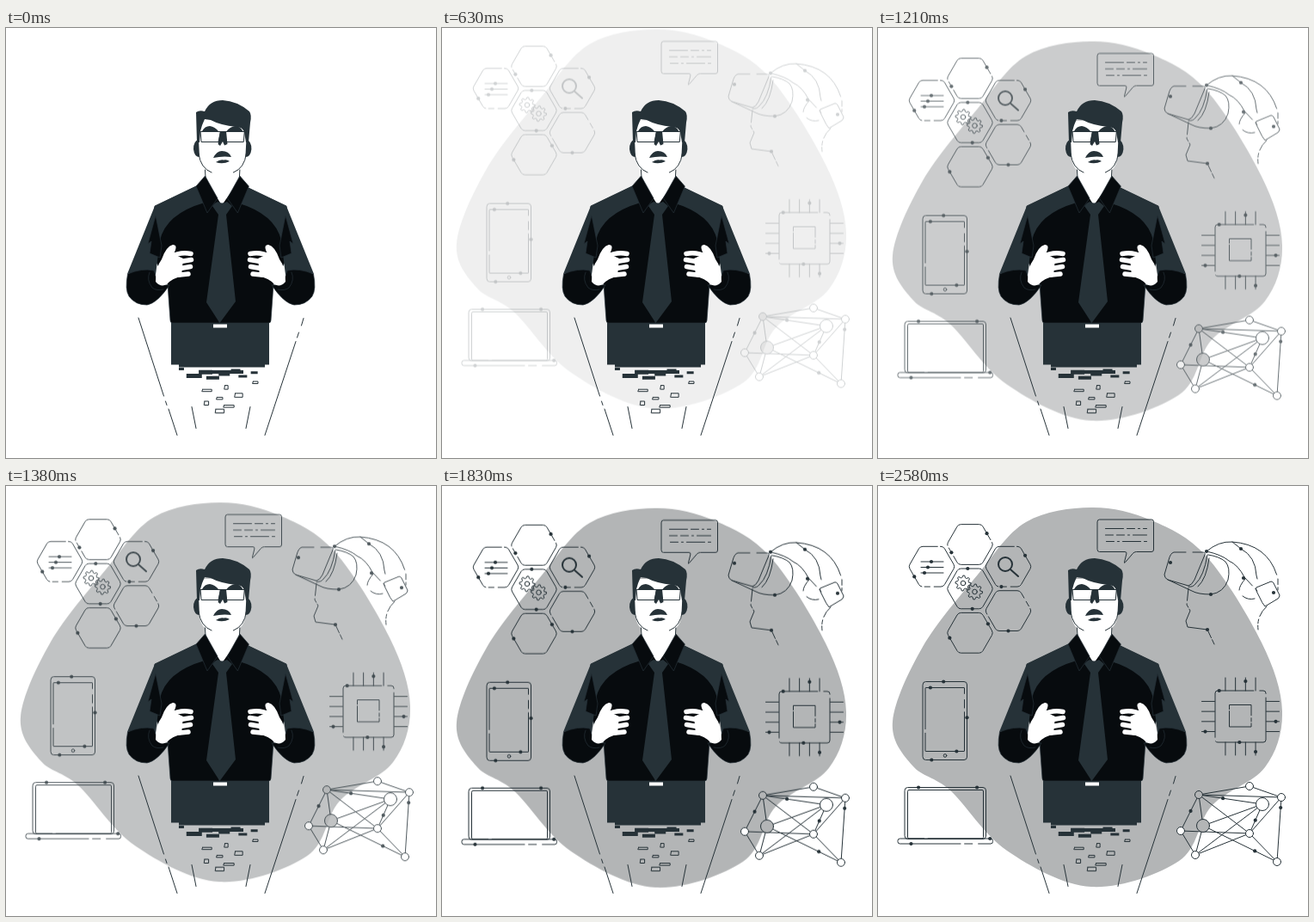
Write an HTML page that moves like this. It is 500 px wide and 500 px high and loops after 2.62 s.

```html
<!DOCTYPE html>
<html lang="en">
<head>
<meta charset="utf-8">
<title>Tech presenter</title>
<style>
html, body { margin: 0; width: 100%; height: 100%; overflow: hidden; background: #fff; }
svg { display: block; width: 100vw; height: 100vh; }
.line { fill: none; stroke: #263238; stroke-linecap: round; stroke-linejoin: round; }
.ink { fill: #263238; }
.black { fill: #070b0e; stroke: #263238; stroke-width: .7; }
.skin { fill: #fff; }
.drop { animation: drop 2620ms infinite; }
.late { animation: late 2620ms infinite step-end; }
@keyframes drop {
  0% { opacity: 0; transform: translateY(-30px); animation-timing-function: cubic-bezier(.36, -.01, .5, 1.38); }
  98.5%, 100% { opacity: 1; transform: none; }
}
@keyframes late {
  0% { opacity: 0; }
  12.59%, 100% { opacity: 1; }
}
</style>
</head>
<body>
<svg viewBox="0 0 500 500">
  <g class="late">
    <path id="blob" class="drop" fill="#b3b5b6"/>
    <g id="icons" class="drop line"></g>
  </g>

  <path class="line" d="M154 337L183.500 428M185.500 434L187 438.500M189 443L199 473.500M346 337.500L343.500 346M340.500 354L338.500 360M337 364.500L301 473.500M216 440.500L221 465.500M284 440.500L279 465.500"/>

  <path class="ink" d="M192 342H306V391.500H192Z"/>
  <g id="side">
    <path class="black" d="M251 190L221 184L173 207L166 255L188 298L191 340Q191 343 194 343H251Z"/>
    <path class="ink" d="M223 183L173 207L141 286Q160 281 174 287L179 247Q186 216 231 203Z"/>
    <path class="black" d="M174 218L165 251L169 248L167 262L179 267L181 253Z"/>
    <path class="black" d="M141.500 286Q138 304 143 312Q150 322 164 322Q176 320 190 299L177 298L172 282Q158 279 141.500 286Z"/>
    <path class="line" stroke-width=".7" d="M167 284Q163 293 170 302Q175 306 183 304"/>
    <path class="skin" d="M174 295Q174 278 181 269Q186 254 194 252Q199 252 197 258L195 263L206 268L204 289Q193 291 187 298Q180 302 174 295Z"/>
    <path fill="none" stroke="#fff" stroke-width="5.5" stroke-linecap="round" d="M191 266Q203 260 215 262.500M194 273L215.500 269.500M194 281L214.500 277.500M192 288L212 286"/>
  </g>
  <use href="#side" transform="matrix(-1 0 0 1 499 0)"/>

  <path class="skin" d="M225 108L224 146Q226 162 231.500 165V176L251 206L272 176V165Q278 161 279 146V108Z"/>
  <g id="half">
    <path class="black" d="M231.500 172L221 184L234 215L246 198Z"/>
    <path class="line" d="M224 146Q226 163 239 168M231.500 165L232 174"/>
    <path class="ink" d="M224 130Q218 131 218 141Q219 150 225 150ZM228 120Q231 114 237 114Q243 115 247 120Z"/>
    <path class="line" style="fill:#fff" d="M226.500 120.500H249.500L247 132.500H227.500Z"/>
  </g>
  <use href="#half" transform="matrix(-1 0 0 1 503.400 0)"/>
  <path class="ink" d="M221 98Q225 95 231 97Q237 84 252 84Q269 85 283 97Q286 101 284 110L282 133L279 133L277 121Q275 115 268 115Q249 113 238 107L231 106Q228 112 226 120L225 133L222 133Z"/>
  <path class="ink" d="M249 120H256L257.500 135L254 136.500L252 132L249 137L246.500 135ZM241 151Q245 143 251 143Q259 143 262 150Q252 148.500 241 151ZM244 156Q249 152.500 253 153.500Q257 152.500 260 155Q252 159 244 156Z"/>
  <path class="ink" d="M240 207Q243 203 246 202Q251 205 257 202L263 207L256 217L267 318L248.500 343L233 319L247 217Z"/>
  <path class="skin" d="M241 344.500H257V348.500H241Z"/>
  <g id="bits"></g>
</svg>
<script>
const $ = id => document.getElementById(id);
const mix = (a, b, t) => [a[0] + (b[0] - a[0]) * t, a[1] + (b[1] - a[1]) * t];
const path = (d, extra = '') => `<path d="${d}" ${extra}/>`;
const ring = ([x, y], r, fill = 'none') => `<circle cx="${x}" cy="${y}" r="${r}" fill="${fill}"/>`;
const dot = p => ring(p, 2.1, '#263238" stroke="none');
const gaps = shift => `pathLength="100" stroke-dasharray="42 3 4 2 47 2" stroke-dashoffset="${shift}"`;
const rect = (x, y, w, h) => [[x, y], [x + w, y], [x + w, y + h], [x, y + h]];
const circle = (n, f) => Array.from({ length: n }, (_, i) => f(i * 2 * Math.PI / n, i));

// Closed polygon with rounded corners.
function poly(pts, r = 0, extra = '') {
  const near = (p, q) => mix(p, q, r / Math.hypot(p[0] - q[0], p[1] - q[1]));
  const d = pts.map((p, i) => {
    const prev = pts.at(i - 1), next = pts[(i + 1) % pts.length];
    return `${i ? 'L' : 'M'}${near(p, prev)}Q${p} ${near(p, next)}`;
  });
  return path(d.join('') + 'Z', extra);
}

// Dots on a polygon: 2.5 is the middle of side 2.
const spots = (pts, ...places) => places.map(s =>
  dot(mix(pts[s | 0], pts[((s | 0) + 1) % pts.length], s % 1))).join('');

// Closed Catmull-Rom curve.
function smooth(pts) {
  const n = pts.length, at = i => pts[(i + n) % n];
  const lean = (i, s) => at(i).map((v, k) => v + s * (at(i + 1)[k] - at(i - 1)[k]) / 6);
  return 'M' + pts[0] + pts.map((_, i) => `C${lean(i, 1)} ${lean(i + 1, -1)} ${at(i + 1)}`).join('') + 'Z';
}

$('blob').setAttribute('d', smooth([
  [248, 25], [172, 42], [116, 103], [52, 187], [17, 274], [40, 325], [84, 354], [150, 424],
  [248, 466], [350, 436], [388, 372], [450, 327], [470, 262], [446, 182], [382, 82], [318, 40]
]));

function hex(col, row, ...places) {
  const pts = circle(6, a => [107 + 44.5 * col + 27 * Math.cos(a), 68 + 25.7 * row + 27 * Math.sin(a)]);
  return poly(pts, 3, row % 2 || !row ? gaps(row * 17) : '') + spots(pts, ...places);
}

function gear(x, y) {
  const teeth = circle(32, (a, i) => {
    const r = i % 4 < 2 ? 9 : 6.6;
    return [x + r * Math.cos(a), y + r * Math.sin(a)];
  });
  return poly(teeth) + ring([x, y], 2.8);
}

function hexes() {
  const sliders = [0, 1, 2].map(i =>
    path(`M50 ${88 + i * 6.5}h26`) + dot([54 + (i * 2 + 2) % 3 * 4, 88 + i * 6.5]));
  return hex(0, 0, 5.45, 2.6) + hex(-1, 1, 2.5) + hex(1, 1, 5.45, 1.8) +
    hex(0, 2, 4.4, 1.4) + hex(1, 3, 1.5) + hex(0, 4, 5.55, 2.75) + sliders.join('') +
    `<g stroke-width="2">${ring([148, 91], 8)}${path('M154 97L163 105')}</g>` +
    gear(99, 113) + gear(112.5, 123);
}

function bubble() {
  const lines = [0, 1, 2].map(i =>
    path(`M264.500 ${49.5 + i * 7.5}h48`, `stroke-dasharray="21 4 9 4 2 4" stroke-dashoffset="${i * 12}"`));
  return lines.join('') +
    poly([[255, 39], [320.5, 39], [320.5, 76.5], [298, 76.5], [286, 90.5], [289.5, 76.5], [255, 76.5]], 2.5);
}

function headset() {
  return path('M358 77H344Q340 78 338 86L333 103Q333 107 337 109L361 116Q365 115 368 109L380 80Q381 77 377 77H366') +
    path('M383 80Q379 105 369 114Q366 118 361 117M337 109L365 122Q372 126 387 126Q402 124 407 109Q410 95 404 88Q397 82 384 80') +
    path('M385 84Q382 108 372 117M382 76Q396 64 412 65L422 73Q439 82 440 104L441 108') +
    path('M382 76Q400 80 408 87Q419 92 426 106L441 122M412 65Q455 68 465 108L465 121', gaps(0)) +
    path('M440 118L457 111Q459 111 460 113L467 127Q467 129 465 131L450 140Q447 137 443 128L440 122ZM427 108Q420 116 420 121M424 128Q430 133 438 131') +
    path('M452 140Q440 151 442 167M361 119L359 138L363 145L358 157L360 164L383 167L391 184', gaps(30)) +
    [[340, 89], [382, 76], [422, 73], [425, 107], [460, 124], [387, 126], [383, 167]].map(dot).join('');
}

function phone() {
  const body = rect(52, 227.5, 51.5, 91), screen = rect(55, 234.5, 45.5, 74);
  return poly(body, 3.5) + poly(screen, .5, gaps(20)) + ring([78, 313.5], 1.8) +
    spots(body, .47, 1.46, 2.8) + spots(screen, .13, 2.2);
}

function laptop() {
  const lid = rect(31, 350.5, 94.5, 60), base = rect(23, 410, 110.5, 6);
  return poly(lid, 3.5) + poly(rect(34.5, 353.5, 88, 56.5), 1.5) + poly(base, 2.5, gaps(-16)) +
    spots(lid, .17, .89) + spots(base, .97, 2.86);
}

function chip() {
  const body = rect(392, 238, 59, 60);
  let pins = '';
  for (let side = 0; side < 4; side++) {
    const x = i => 421.5 + (i - 1.5) * 11.7;
    pins += `<g transform="rotate(${side * 90} 421.5 268)">` +
      path([0, 1, 2, 3].map(i => `M${x(i)} 238v-15`).join('')) + dot([x(side < 2 ? 2 : 0), 227]) + '</g>';
  }
  return pins + poly(body, 3, gaps(22)) + poly(rect(408.5, 254.5, 25.5, 25.5), 0, gaps(5)) + spots(body, .08, 2.52);
}

function network() {
  const nodes = {
    A: [373, 359], B: [432, 349], C: [469, 362], D: [447, 370], E: [378, 395],
    F: [352, 401], G: [369, 429], H: [464, 437], I: [432, 404]
  };
  const ends = pair => [...pair].map(k => nodes[k]);
  const links = 'AB AC AD BC CH CI DI DG DE AI AF AE EG FG GI EH IH FI'.split(' ');
  return path(links.map(l => 'M' + ends(l).join('L')).join('')) +
    Object.entries(nodes).map(([k, p]) =>
      ring(p, 'DE'.includes(k) ? 7.5 : 4.5, 'AE'.includes(k) ? '#b3b5b6' : '#fff')).join('') +
    Object.entries({ AD: .38, CH: .16, DI: .55, AF: .45, EH: .7 }).map(([l, t]) => dot(mix(...ends(l), t))).join('');
}

$('icons').innerHTML = hexes() + bubble() + headset() + phone() + laptop() + chip() + network();

// Pixels crumble away: wide solid strips first, then small open boxes.
function crumbs() {
  let out = poly(rect(201, 391, 100, 3.5), 0, 'class="ink"') + poly(rect(226, 398, 50, 4), 0, 'class="ink"');
  for (let i = 0; i < 16; i++) {
    const solid = i < 8, spread = solid ? 98 : 84 - (i - 8) * 9;
    const x = 248 + spread * ((i * .618 + .02) % 1 - .5), y = solid ? 395 + i * 1.4 : 411 + (i - 8) * 4.6;
    const w = solid ? 6 + i * 5 % 13 : 4 + i * 7 % 9, h = solid ? 3 + i % 3 : 2.5 + i % 2 * 2;
    out += poly(rect(x, y, w, h), 0, `class="${solid ? 'ink' : 'line'}"`);
  }
  return out;
}
$('bits').innerHTML = crumbs();
</script>
</body>
</html>
```
